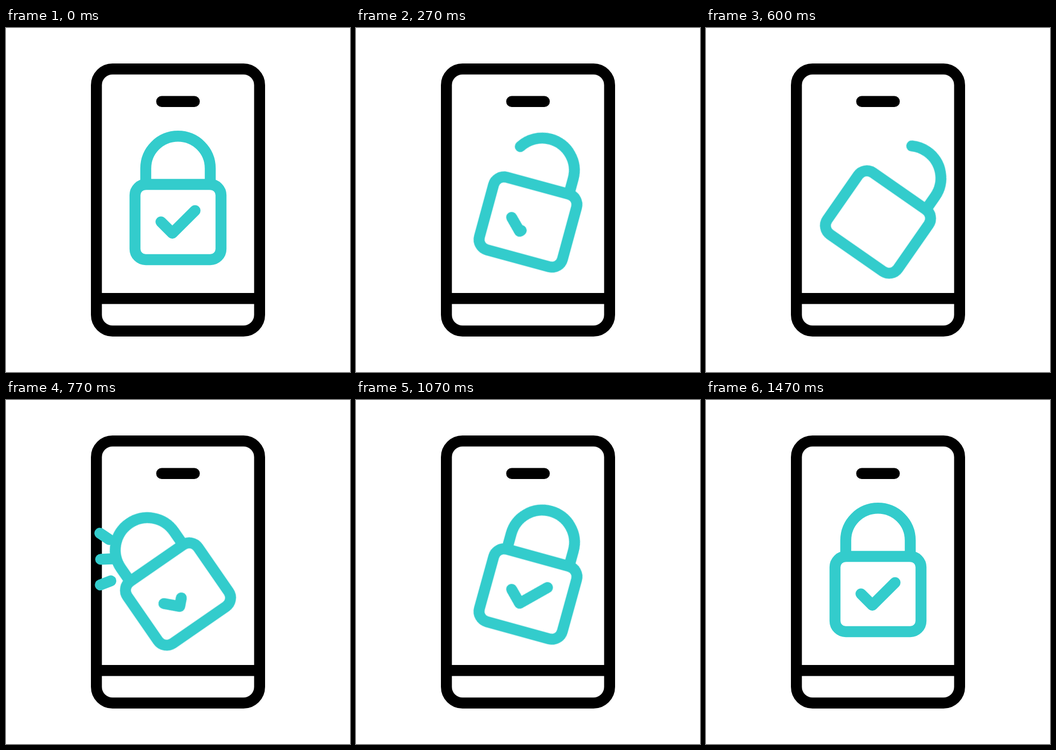
Animation of 640 by 640 pixels, one loop 1.67 s. Source, as an HTML page without scripts:

```html
<!DOCTYPE html>
<html lang="en">
<head>
<meta charset="utf-8">
<title>Phone lock</title>
<style>
  html, body { margin: 0; width: 100%; height: 100%; overflow: hidden; background: #fff; }
  svg { display: block; width: 100%; height: 100%; }

  .ink, .accent { fill: none; stroke-width: 20.4; stroke-linecap: round; stroke-linejoin: round; }
  .ink { stroke: #000; }
  .accent { stroke: #3cc; }

  .lock, .shackle, .check, .sparks path {
    animation: 1670ms cubic-bezier(.333, 0, .667, 1) infinite;
  }
  .lock { transform-origin: 320px 361px; animation-name: swing; }

  /* Lines are drawn and erased by sliding one long dash along the path. */
  .shackle, .check, .sparks path { stroke-dasharray: 100 300; }
  .shackle { animation-name: unlatch; }
  .check { animation-name: tick; }
  .sparks path { animation-name: burst; }

  @keyframes swing {
    0%, 3.6% { transform: rotate(0deg); }
    33.7% { transform: rotate(40deg); }
    48.5% { transform: rotate(-40deg); }
    63.3% { transform: rotate(15.7deg); }
    75.8% { transform: rotate(-7.4deg); }
    87.8%, 100% { transform: rotate(0deg); }
  }
  @keyframes unlatch {
    0%, 44.5%, 100% { stroke-dashoffset: 0; }
    31.9% { stroke-dashoffset: 50; }
  }
  @keyframes tick {
    0%, 55.9%, 100% { stroke-dashoffset: 0; }
    27.9%, 35.9% { stroke-dashoffset: 101; }
  }
  @keyframes burst {
    0%, 41.9% { stroke-dashoffset: 101; }
    52.9% { stroke-dashoffset: 0; }
    61.9%, 100% { stroke-dashoffset: -101; }
  }
</style>
</head>
<body>
<svg viewBox="0 0 640 640">
  <g class="ink">
    <rect x="168.2" y="76.2" width="303.6" height="487.6" rx="30"/>
    <path d="M168.2 503.2H471.8M289.6 136.7H350.4"/>
  </g>
  <g class="accent sparks">
    <path pathLength="100" d="M192 259.5L139 224"/>
    <path pathLength="100" d="M197 295.5L133.500 298"/>
    <path pathLength="100" d="M195 336.500L135.500 359.500"/>
  </g>
  <g class="accent lock">
    <path class="shackle" pathLength="100" d="M380 291V261.300a60 60 0 0 0-120 0V291"/>
    <rect x="240" y="291" width="160" height="140" rx="20"/>
    <path class="check" pathLength="100" d="M288.300 360.600L309.500 381.800L351.700 339.800"/>
  </g>
</svg>
</body>
</html>
```
